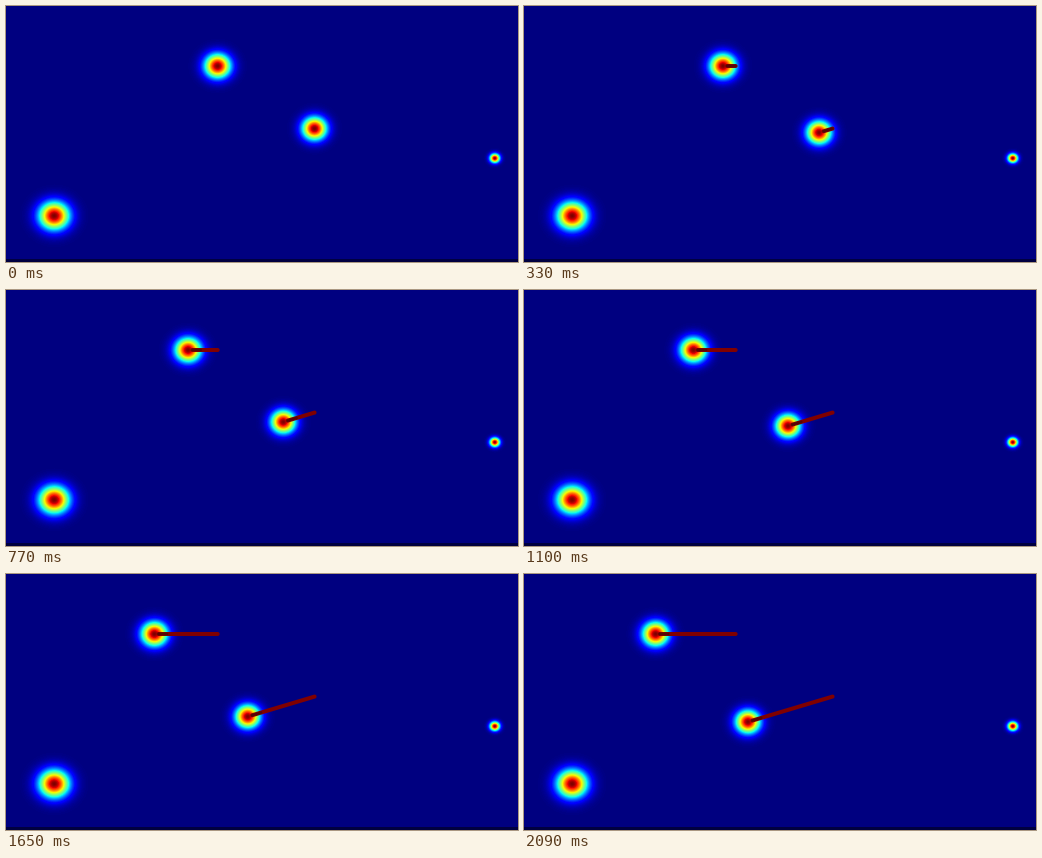
A matplotlib script for the animation above (2.2 s loop, 512x256 px).

```python
import numpy as np
import matplotlib.pyplot as plt
from matplotlib.animation import FuncAnimation

W, H = 512, 256
FRAMES, STEP_MS = 20, 110
TRAIL_RED = (128, 0, 0)
TRAIL_DARK = (84, 6, 4)
FLOOR = (0, 0, 64)

# Moving sources: start, step per frame, spread (x, y)
MOVERS = [
    (np.array([211.6, 60.0]), np.array([-4.21, 0.0]), (8.8, 8.2)),
    (np.array([308.5, 122.6]), np.array([-4.45, 1.33]), (8.3, 7.8)),
]
FIXED = [((48.2, 209.8), (10.3, 9.4)), ((488.8, 152.2), (3.4, 3.1))]

X, Y = np.meshgrid(np.arange(W) + 0.5, np.arange(H) + 0.5)


def blob(center, spread):
    dx = (X - center[0]) / spread[0]
    dy = (Y - center[1]) / spread[1]
    return np.exp(-(dx**2 + dy**2) / 2)


def paint(img, cover, color):
    cover = cover[..., None]
    return img * (1 - cover) + np.array(color) * cover


def trail_cover(a, b, radius=2.0):
    """Soft-edged round-capped line from a to b."""
    d = b - a
    length2 = max(d @ d, 1e-9)
    u = np.clip(((X - a[0]) * d[0] + (Y - a[1]) * d[1]) / length2, 0, 1)
    dist = np.hypot(X - a[0] - u * d[0], Y - a[1] - u * d[1])
    return np.clip(radius + 0.5 - dist, 0, 1)


STATIC = sum(blob(c, s) for c, s in FIXED)


def render(k):
    field = STATIC + sum(blob(p + k * v, s) for p, v, s in MOVERS)
    img = plt.cm.jet(np.clip(field, 0, 1))[..., :3] * 255
    if k:
        for start, step, _ in MOVERS:
            last = start + (k - 1) * step
            fresh = start + max(k - 3, 0) * step
            img = paint(img, trail_cover(start, last), TRAIL_RED)
            img = paint(img, trail_cover(fresh, last, 1.2), TRAIL_DARK)
    img[H - 3:] = FLOOR
    return np.round(img).astype(np.uint8)


fig = plt.figure(figsize=(W / 100, H / 100), dpi=100)
ax = fig.add_axes([0, 0, 1, 1])
ax.axis("off")
view = ax.imshow(render(0), interpolation="nearest", aspect="auto")


def update(k):
    view.set_data(render(k))
    return [view]


anim = FuncAnimation(fig, update, frames=FRAMES, interval=STEP_MS,
                     repeat=True, repeat_delay=0, blit=False)
plt.show()
```
